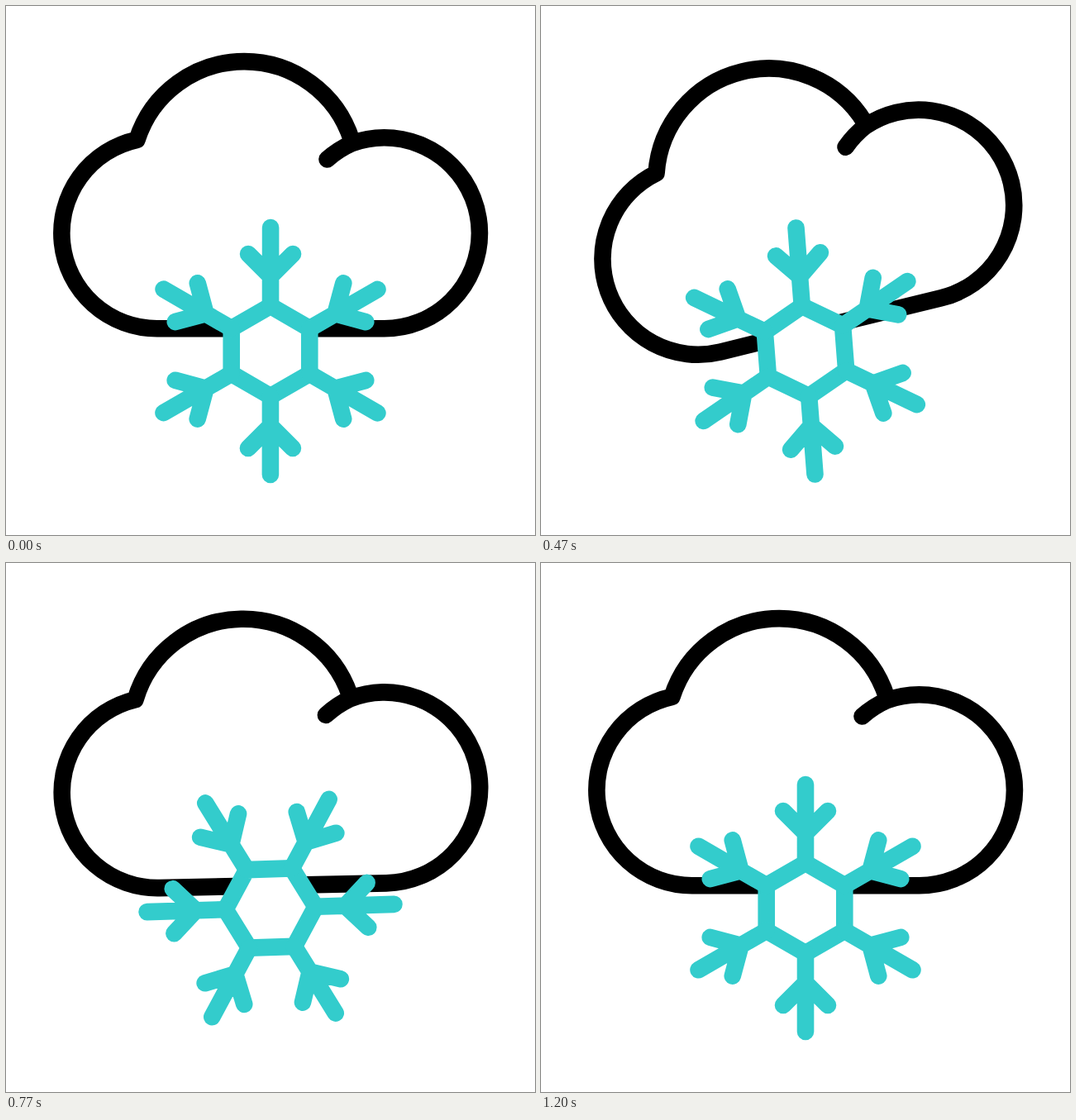
Recreate the animation shown at these times as an HTML page. Size 640 px wide and 640 px high, loop 1.67 s.

```html
<!DOCTYPE html>
<html lang="en">
<head>
<meta charset="utf-8">
<title>Snow cloud</title>
<style>
  html, body { margin: 0; width: 100%; height: 100%; overflow: hidden; background: #fff; }
  svg { display: block; width: 100vw; height: 100vh; }
  g { fill: none; stroke-width: 20.6; stroke-linecap: round; stroke-linejoin: round; }
  #cloud { stroke: #000; }
  #flake { stroke: #3cc; }
  #hex { fill: #fff; }
</style>
</head>
<body>
<svg viewBox="0 0 640 640">
  <g id="cloud">
    <path d="M388.5 185.5Q402 173.5 418 166.4A115.5 115.5 0 0 1 457.5 159.3A115.5 115.5 0 0 1 457.5 390.3H182.8A115.5 115.5 0 0 1 158.5 161.9A136.2 136.2 0 0 1 418 161.9"/>
  </g>
  <g id="flake"><path id="hex"/><path id="arms"/></g>
</svg>
<script>
  const LOOP = 1670, LAST = 36, R = 54.6;
  const $ = id => document.getElementById(id);

  const sq = x => Math.max(0, x) ** 2;

  // Smooth rise from 0 to 1 between a and b
  function rise(a, b, n) {
    const x = Math.min(1, Math.max(0, (n - a) / (b - a)));
    return x * x * (3 - 2 * x);
  }

  // One full turn: speed up, cruise, brake, then creep to the end
  function spin(n) {
    const stop = 27.7, m = Math.min(n, stop);
    const cruise = 17.5 * m - 69.4;
    return cruise + 0.516 * sq(11.6 - m) - 1.325 * sq(m - 21.08) + 0.327 * (n - m);
  }

  // Shrinking swings: left, right, slightly left, rest
  function sway(n) {
    return -13.7 * rise(5, 14, n) + 20.3 * rise(14, 20, n)
           - 7.8 * rise(20, 23, n) + 1.2 * rise(23, LAST, n);
  }

  function point(x, y, deg) {
    const r = deg * Math.PI / 180, c = Math.cos(r), s = Math.sin(r);
    return (x * c - y * s).toFixed(2) + ' ' + (x * s + y * c).toFixed(2);
  }

  let hex = '', arms = '';
  for (let a = 0; a < 360; a += 60) {
    const p = (x, y) => point(x, y, a);
    hex += (a ? 'L' : 'M') + p(0, -R);
    arms += `M${p(0, -R)}L${p(0, -149.5)}M${p(-27, -117.5)}L${p(0, -90.5)}L${p(27, -117.5)}`;
  }
  $('hex').setAttribute('d', hex + 'Z');
  $('arms').setAttribute('d', arms);

  function draw() {
    const t = performance.now() % LOOP;
    // 30 steps per second on a 10 ms clock, then a rest
    const n = Math.min(LAST, Math.floor((Math.floor(t / 10) * 10 + 5) * 0.03));
    $('cloud').setAttribute('transform', `rotate(${sway(n)} 317 261)`);
    $('flake').setAttribute('transform', `translate(320 417.5) rotate(${spin(n)})`);
    requestAnimationFrame(draw);
  }
  draw();
</script>
</body>
</html>
```
